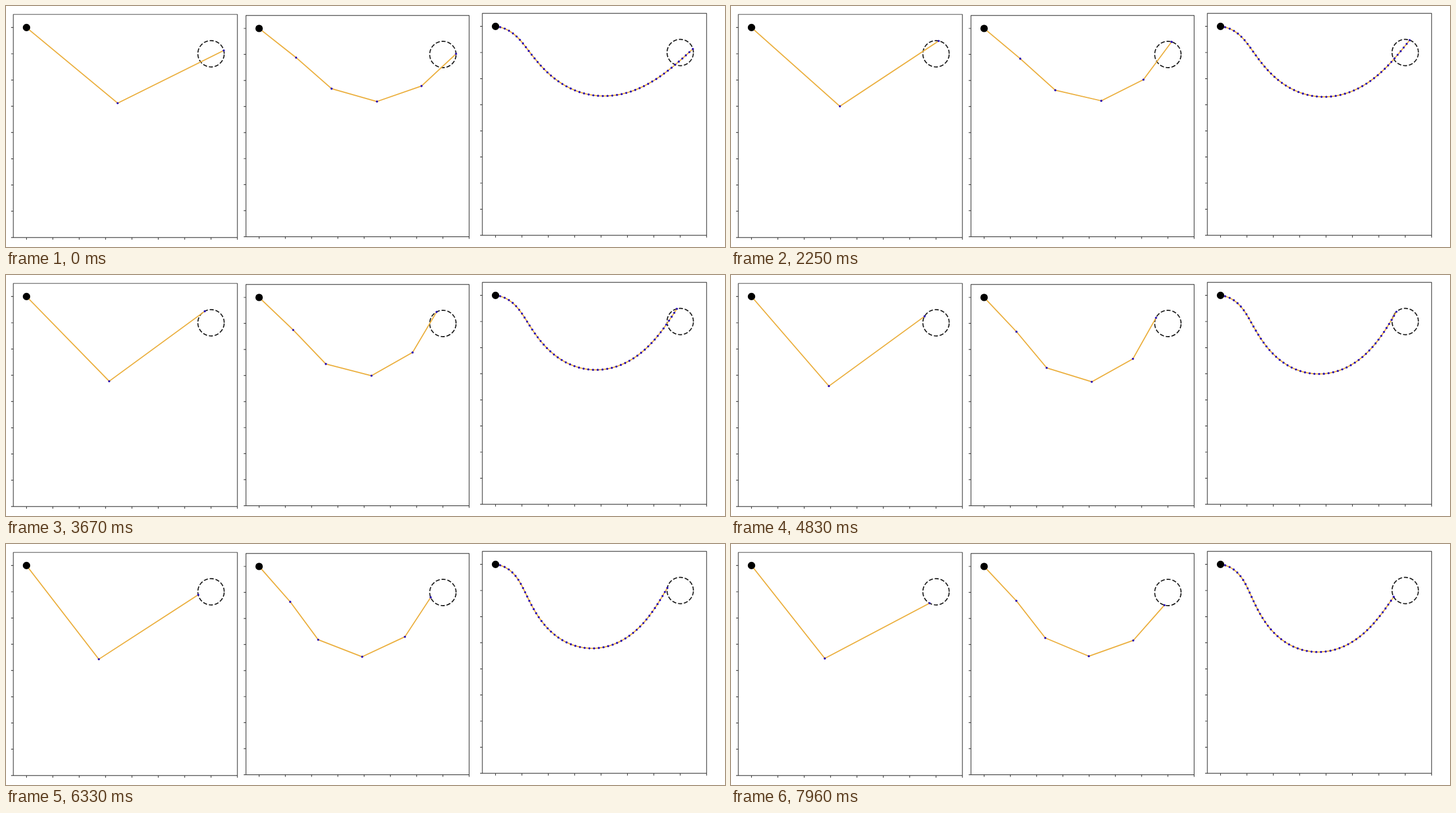
Animation of 1280 by 430 pixels, one loop 8000 ms. Source, as an HTML page with a canvas:

```html
<!DOCTYPE html>
<html lang="en">
<head>
<meta charset="utf-8">
<title>Robot arms tracing a circle</title>
<style>
  html, body { margin: 0; width: 100%; height: 100%; overflow: hidden; background: #fff; }
  canvas { display: block; width: 1280px; height: 430px; }
</style>
</head>
<body>
<canvas id="stage" width="1280" height="430"></canvas>
<script>
const ctx = document.getElementById('stage').getContext('2d');
const LOOP = 8000, FPS = 24, RADIUS = 23.4;
const rad = deg => deg * Math.PI / 180;

// Direction of link i of the long arm: dips steeply, then swings up again.
function curveAngle(i) {
  if (i < 9) return 52 * Math.sin(Math.PI / 2 * i / 9);
  return 4.5 + 47.5 * Math.cos(Math.PI * ((i - 9) / 41) ** 0.85);
}

// x, y: arm base; dx, dy: tick spacing; angles: first pose, in degrees;
// phase and speed (per ms): where the tip is on the circle, in degrees.
const ARMS = [
  { x: 36.5, y: 38.4, dx: 46.93, dy: 46.83, link: 211, phase: 14.5, speed: 0.0284,
    angles: [39.6, -26.7] },
  { x: 450.6, y: 40, dx: 46.74, dy: 46.45, link: 84, phase: 2.5, speed: 0.0317,
    angles: [37.5, 40.2, 15.2, -19.1, -42.3] },
  { x: 871.5, y: 36.4, dx: 46.97, dy: 46.6, link: 8.45, phase: 15.8, speed: 0.02425,
    angles: Array.from({ length: 50 }, (_, i) => curveAngle(i + 1)) }
];

// Joint positions, base first, from the bend at each joint.
function locate(arm, bends) {
  let { x, y } = arm, a = 0;
  const points = [[x, y]];
  for (const bend of bends) {
    a += bend;
    points.push([x += arm.link * Math.cos(a), y += arm.link * Math.sin(a)]);
  }
  return points;
}

// Moves the tip to a target with the least total change of the bends.
function reach(arm, bends, [gx, gy]) {
  for (let n = 0; n < 4; n++) {
    const points = locate(arm, bends);
    const [tx, ty] = points.pop();
    const levers = points.map(([x, y]) => [y - ty, tx - x]);
    let a = 0, b = 0, c = 0;
    for (const [u, v] of levers) { a += u * u; b += u * v; c += v * v; }
    const ex = gx - tx, ey = gy - ty, det = a * c - b * b;
    const p = (c * ex - b * ey) / det, q = (a * ey - b * ex) / det;
    bends = bends.map((bend, i) => bend + levers[i][0] * p + levers[i][1] * q);
  }
  return bends;
}

// All poses of one loop; each pose starts from the one before.
function simulate(arm) {
  let bends = arm.angles.map((deg, i) => rad(deg - (i ? arm.angles[i - 1] : 0)));
  return Array.from({ length: LOOP * FPS / 1000 }, (_, n) => {
    const turn = rad(arm.phase + arm.speed * n * 1000 / FPS);
    bends = reach(arm, bends, [
      arm.x + 7 * arm.dx + RADIUS * Math.cos(turn),
      arm.y + arm.dy - RADIUS * Math.sin(turn)
    ]);
    return locate(arm, bends);
  });
}

function dot(x, y, r, color) {
  ctx.fillStyle = color;
  ctx.beginPath();
  ctx.arc(x, y, r, 0, 2 * Math.PI);
  ctx.fill();
}

function drawAxes({ x, y, dx, dy }) {
  const left = x - dx / 2, top = y - dy / 2;
  const right = x + 8 * dx, bottom = y + 8 * dy;
  ctx.strokeStyle = '#3a3a3a';
  ctx.lineWidth = 1.2;
  ctx.beginPath();
  ctx.rect(left, top, right - left, bottom - top);
  for (let i = 0; i <= 8; i++) {
    ctx.moveTo(x + i * dx, bottom);
    ctx.lineTo(x + i * dx, bottom + 4);
    ctx.moveTo(left, y + i * dy);
    ctx.lineTo(left - 4, y + i * dy);
  }
  ctx.stroke();

  ctx.strokeStyle = '#1c1c1c';
  ctx.lineWidth = 1.9;
  ctx.setLineDash([7.4, 3.2]);
  ctx.beginPath();
  ctx.arc(x + 7 * dx, y + dy, 23.5, 0, -2 * Math.PI, true);
  ctx.stroke();
  ctx.setLineDash([]);
}

function drawArm(points) {
  const [base, ...joints] = points;
  ctx.strokeStyle = '#ebb040';
  ctx.lineWidth = 2;
  ctx.lineJoin = 'round';
  ctx.beginPath();
  points.forEach(([x, y]) => ctx.lineTo(x, y));
  ctx.stroke();
  joints.forEach(([x, y]) => dot(x, y, 1.9, '#2a10b4'));
  dot(...base, 6.6, '#000');
}

const poses = ARMS.map(simulate);
const start = performance.now();

function draw() {
  const t = (performance.now() - start) % LOOP;
  const n = Math.floor(t * FPS / 1000);
  ctx.fillStyle = '#fff';
  ctx.fillRect(0, 0, 1280, 430);
  ARMS.forEach((arm, i) => {
    drawAxes(arm);
    drawArm(poses[i][n]);
  });
  requestAnimationFrame(draw);
}
draw();
</script>
</body>
</html>
```
